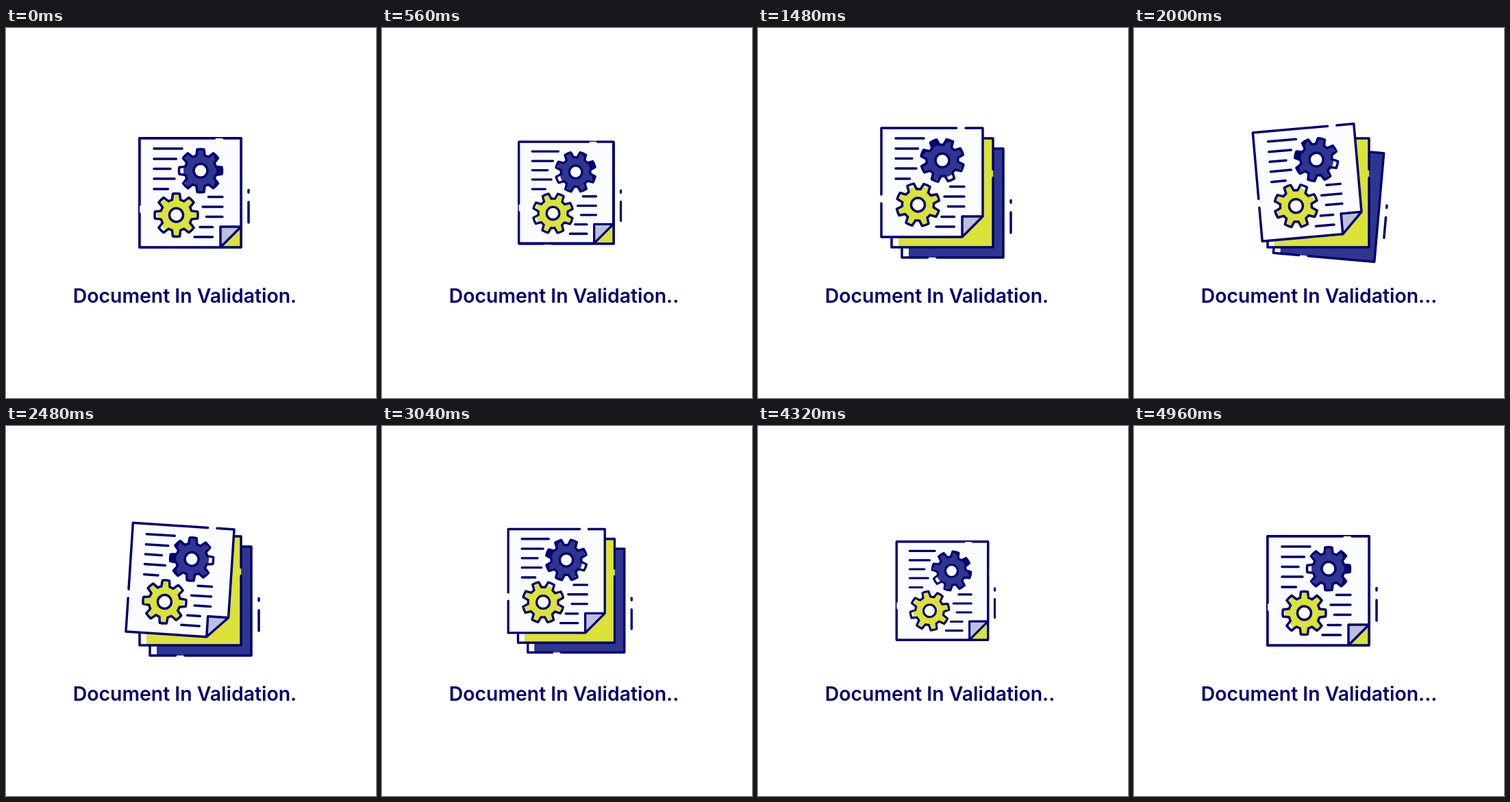
These frames come from a looping animation (540 px wide and 540 px high, 5 s). An HTML page:

```html
<!DOCTYPE html>
<html lang="en">
<head>
<meta charset="utf-8">
<title>Document In Validation</title>
<style>
  html, body { margin: 0; width: 100%; height: 100%; overflow: hidden; background: #fff; }
  svg { display: block; width: 100vw; height: 100vh; }

  .line { fill: none; stroke: #010073; stroke-width: 3.5; stroke-linecap: round; stroke-linejoin: round; }
  .paper { fill: #fafcff; }
  .lime { fill: #dbe238; }
  .blue { fill: #2e368f; }
  .navy { fill: #010073; }
  .fold { fill: #bcbfdc; }
  text { font: 600 28.4px Inter, sans-serif; fill: #010073; text-anchor: middle; }

  .stack, .front, .back, .turn {
    animation: 5s cubic-bezier(.333, 0, .667, 1) infinite;
  }
  .stack, .front, .back { transform-origin: 269px 240.5px; }
  .stack { animation-name: pulse; }
  .front { --d: -15px; animation-name: spread, sway; }
  .back { --d: 15px; animation-name: spread, tilt; }
  .turn { --a: -180deg; animation-name: turn; }
  .turn.ccw { --a: 180deg; }
  .dot2, .dot3 { animation: dot2 5s step-end infinite; }
  .dot3 { animation-name: dot3; }

  @keyframes pulse {
    0%, 28%, 56%, 97%, 100% { scale: 1; }
    9%, 66%, 86.6% { scale: .9; }
    19%, 78% { scale: 1.15; }
  }
  @keyframes spread {
    0%, 10%, 86.6%, 100% { translate: 0 0; }
    23.2%, 65% { translate: var(--d) var(--d); }
  }
  @keyframes sway {
    0%, 32%, 55%, 100% { rotate: 0deg; }
    40% { rotate: -5deg; }
    47% { rotate: 5deg; }
  }
  @keyframes tilt {
    0%, 32%, 48%, 100% { rotate: 0deg; }
    40% { rotate: 5deg; }
  }
  @keyframes turn {
    0%, 100% { rotate: 0deg; }
    50% { rotate: var(--a); }
  }
  @keyframes dot2 {
    0%, 24%, 48%, 72% { fill-opacity: 0; }
    8%, 32%, 56%, 80%, 100% { fill-opacity: 1; }
  }
  @keyframes dot3 {
    0%, 24%, 48%, 72% { fill-opacity: 0; }
    16%, 40%, 64%, 88%, 100% { fill-opacity: 1; }
  }
</style>
</head>
<body>
<svg viewBox="0 0 540 540">
  <defs>
    <path id="gear"/>
    <clipPath id="cut"><use href="#gear"/></clipPath>
  </defs>

  <g class="stack">
    <g class="back">
      <path class="paper" d="M195 161h148v159H195z"/>
      <path class="blue" d="M205 161h138v159H205z"/>
      <path class="line" d="M232.5 320H195V161H343V320H246M354 236.5v3.5M354 254v30"/>
    </g>

    <g class="middle">
      <path class="paper" d="M195 161h148v159H195z"/>
      <path class="lime" d="M205 161h138v159H205z"/>
      <path class="line" d="M343 206.5V161H195V320H343V218.5"/>
    </g>

    <g class="front">
      <path class="paper" d="M195 161H343V290L313 320H195z"/>
      <path class="fold" d="M313 320V290H343z"/>
      <path class="line" d="M304.5 161H195V258M195 271V320H313L343 290V161H318M313 320V290H343"/>
      <path class="line" d="M216 176h41M216 191h32.500M216 205.500h24M216 220h30M216 235h20.500"/>
      <path class="line" d="M295.500 246.500h20.500M287 261h29M292.500 275.500h23.500M283 290.500h18.500M275 305h26.500"/>

      <g transform="translate(284 208.3)">
        <g class="turn">
          <g clip-path="url(#cut)">
            <circle class="paper" r="34"/>
            <path class="navy" d="M0-34h34v68H0z"/>
            <ellipse class="blue" cx="-1" rx="24" ry="42"/>
          </g>
          <use class="line" href="#gear"/>
        </g>
        <circle class="paper" r="10"/>
        <circle class="line" r="10"/>
      </g>

      <g transform="translate(248.5 273)">
        <g class="turn ccw">
          <g clip-path="url(#cut)">
            <circle class="paper" r="34"/>
            <ellipse class="lime" cx="7" rx="33" ry="48" transform="rotate(-30)"/>
          </g>
          <use class="line" href="#gear"/>
        </g>
        <circle class="paper" r="10"/>
        <circle class="line" r="10"/>
      </g>
    </g>
  </g>

  <text x="270" y="401">Document In Validation.<tspan class="dot2">.</tspan><tspan class="dot3">.</tspan></text>
</svg>
<script>
  // Eight tapered teeth joined by arcs along the root circle
  const TEETH = 8, TIP = 31.5, ROOT = 23;
  const at = (r, a) => `${(r * Math.cos(a)).toFixed(2)} ${(r * Math.sin(a)).toFixed(2)}`;
  let d = '';
  for (let i = 0; i < TEETH; i++) {
    const a = i * 2 * Math.PI / TEETH;
    d += (i ? `A${ROOT} ${ROOT} 0 0 1 ` : 'M') + at(ROOT, a - .27);
    d += `L${at(TIP, a - .16)}A${TIP} ${TIP} 0 0 1 ${at(TIP, a + .16)}L${at(ROOT, a + .27)}`;
  }
  d += `A${ROOT} ${ROOT} 0 0 1 ${at(ROOT, -.27)}z`;
  document.getElementById('gear').setAttribute('d', d);
</script>
</body>
</html>
```
